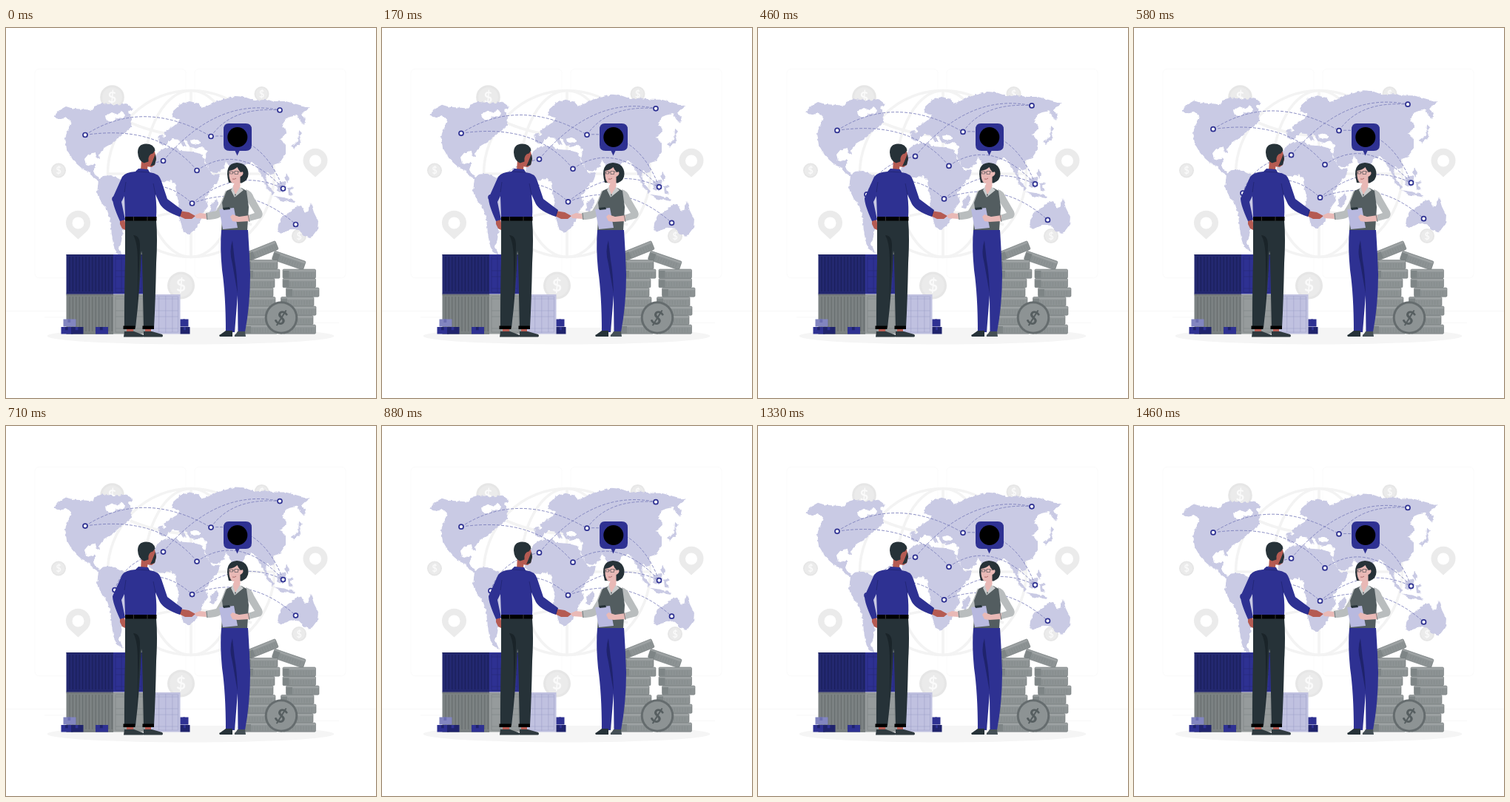
An HTML page that plays this animation: 500 px wide and 500 px high, repeating every 1.5 s.

```html
<!DOCTYPE html>
<html lang="en">
<head>
<meta charset="utf-8">
<title>Global trade</title>
<style>
  html, body { margin: 0; width: 100%; height: 100%; overflow: hidden; background: #fff; }
  svg { display: block; width: 100vw; height: 100vh; }
  text { font-family: Lato, sans-serif; text-anchor: middle; }
</style>
</head>
<body>
<svg viewBox="0 0 500 500">
  <defs>
    <filter id="coast" x="-5%" y="-5%" width="110%" height="110%" color-interpolation-filters="sRGB">
      <feTurbulence type="fractalNoise" baseFrequency=".25" seed="4"/>
      <feDisplacementMap in="SourceGraphic" scale="4" xChannelSelector="R" yChannelSelector="G"/>
    </filter>
  </defs>

  <g fill="none" stroke="#f5f5f5" stroke-width=".5">
    <rect x="39" y="55.3" width="204" height="282.4" rx="5.5"/>
    <rect x="255" y="55.3" width="204" height="282.4" rx="5.5"/>
    <path stroke="#ebebeb" stroke-width=".4" d="M0 382.5H500M417 398.6h33M397 389.3h19M52 391h43M104.500 391h6.300M131.500 395.200h93.700"/>
  </g>
  <g fill="none" stroke="#f3f3f3" stroke-width="3.6">
    <circle cx="250" cy="197" r="112.500"/>
    <ellipse cx="250" cy="197" rx="63" ry="112.500"/>
    <path d="M250 85V309M137 197H363M168 128Q250 163 332 128M168 266Q250 231 332 266"/>
  </g>
  <g id="backdrop"></g>
  <ellipse cx="249.500" cy="416.200" rx="193.900" ry="11.300" fill="#f5f5f5"/>

  <g id="map">
    <g fill="#c9cae4" filter="url(#coast)">
      <path d="M65 119L72 111 81 106 91 109 106 110 118 111 119 105 130 102 148 104 163 102 172 109 165 113 170 123 169 134 162 140 154 147 145 155 134 161 126 171 127 178 123 176 121 168 111 171 106 177 108 185 114 187 119 183 122 185 118 192 120 199 128 204 126 207 117 201 113 195 104 191 96 184 89 176 82 164 80 149 84 137 88 127 82 121 74 123 68 122Z"/>
      <path d="M125 206L131 200 142 199 151 203 159 207 169 214 180 222 179 236 172 250 163 262 158 274 156 288 153 298 158 309 151 306 146 297 143 280 141 260 137 247 129 236 123 223Z"/>
      <path d="M207 156L207 148 216 147 213 142 223 135 230 130 234 124 225 120 226 112 236 103 248 99 260 102 265 108 275 104 285 99 296 96 310 92 322 93 336 98 350 97 364 99 378 99 393 103 411 108 404 112 399 117 405 123 403 131 397 125 394 118 384 120 377 123 374 132 379 140 376 146 371 150 378 159 378 170 370 182 361 185 363 195 358 199 353 194 351 201 354 214 347 202 340 189 333 181 323 186 313 207 304 191 297 180 295 188 285 196 276 195 268 178 272 167 264 160 256 163 248 160 243 152 240 153 244 160 239 160 234 151 226 150 219 153 216 159Z"/>
      <path d="M205 168L215 162 230 161 236 166 250 167 264 170 270 184 278 198 290 197 286 208 276 219 270 229 273 241 267 249 262 262 255 273 246 279 240 276 236 262 231 248 234 236 230 224 229 212 223 206 212 208 202 208 194 200 195 187Z"/>
      <path d="M285 231L287 238 281 250 275 249 277 239ZM396 138L400 142 397 146 399 154 389 163 385 160 395 153ZM367 210L377 207 379 215 373 223 366 220ZM349 206L362 222 361 226 352 216ZM362 227L375 229 391 233 389 236 371 233ZM381 216L389 215 384 220 388 227 382 226ZM379 197L383 203 381 210 377 204ZM207 145L212 144 211 150 206 151Z"/>
      <path d="M368 266L372 256 383 250 391 242 399 240 403 248 408 249 412 236 416 249 422 261 421 272 412 284 403 281 396 273 385 272 372 278 367 275Z"/>
    </g>
    <path fill="#fff" filter="url(#coast)" d="M134 119L143 114 151 117 155 112 161 117 159 123 150 122 142 127 136 125ZM249 152L256 150 263 153 260 157 250 156Z"/>
    <path fill="none" stroke="#7d80bd" stroke-width=".9" stroke-dasharray="4 2"
      d="M107 144.500Q185 94 277 146.500M107 144.500Q207 130 258 192.500M212.500 179.500Q285 93 370 111M277 146.500Q305 106 370 111M277 146.500Q345 140 374.500 217M258 192.500Q315 153 374.500 217M251.500 237Q312 187 374.500 217M251.500 237Q328 208 391.500 265.500M147 231Q160 190 212.500 179.500M147 231Q203 192 251.500 237"/>
    <g id="stops" fill="#fff" stroke="#2e3192" stroke-width="1.700"></g>
  </g>

  <g id="goods"></g>

  <path fill="#2e3192" d="M301 129h23q8 0 8 8v21q0 8-8 8h-8.500l-3 6.500-3-6.500H302q-8 0-8-8v-21q0-8 7-8Z"/>
  <circle cx="312.800" cy="147.500" r="13.500"/>

  <!-- man -->
  <g>
    <path fill="#b55b52" d="M154 259l6 0 2 8-1 6-4-2-3-6ZM183 178l9 0-1 14-9 1ZM234 247l13 2 9 5-5 4-9 0-8-4Z"/>
    <path fill="#b55b52" d="M191 167l10 0 2 10-2 8-4 3-8-1Z"/>
    <path fill="#263238" d="M178 168q0-11 11-11.500 11 0 12.500 9l-3 4-3 1-3 5 0 5-6 2q-8-3-8.500-14.500Z"/>
    <path fill="#263238" d="M195 187l3-7 4-10 1 7-2 8Z"/>
    <ellipse cx="195.500" cy="175.500" rx="2.300" ry="4" fill="#b55b52"/>
    <path fill="#263238" d="M161 260h42q2 24 0 58-1 50-3 87h-14l-2-90-1-14q-2 54-8 104h-15q0-60 1-90Z"/>
    <path fill="#1a2429" d="M172 280q9 0 9 14-2 60-6 110 4-50 3-88 0-26-6-36Z"/>
    <path fill="#b55b52" d="M163 406h9v5h-9ZM188 406h8v5h-8Z"/>
    <path d="M158.500 402.500h16v4.500h-16ZM184.500 402.500h15.500v4.500h-15.500ZM161 255h42.500v5.500H161Z"/>
    <path stroke="#555" stroke-width=".7" d="M172.500 255v5.500M191 255v5.500"/>
    <path fill="#2f3a3f" d="M160 410h13l13 5q1 2-1 2.500h-26ZM186 410h11l14 4q2 2 0 3.500h-25Z"/>
    <path fill="#2e3192" d="M175 194l4-4 13 1 2 4q13 1 16 12l8 24 20 15-3 9q-21-7-27-17l-6-13q2 18 1 30h-42l-1-28-4 8 5 24-7 2q-10-22-10-31l13-29q4-6 18-7Z"/>
    <path fill="none" stroke="#1f236c" stroke-width=".7" d="M176 194l18 1M160 222l2-14M202 225l-3-15M235 254l2-8"/>
  </g>

  <!-- woman -->
  <g>
    <path fill="#263238" d="M301 209q-7-26 11-27 15 1 15.500 15 0 9-9 12.500Z"/>
    <path fill="#e9b9b6" d="M301.500 193q7-1 11-5 2 5 5 7 3-2 3 1t-4 5l0 13-6 10-4-10 2-4q-6 0-7-10Z"/>
    <path fill="none" stroke="#263238" stroke-width=".5" d="M302.500 194h4v3h-4ZM309 193.500h4.500v4H309ZM306.500 195h2.500M313.500 194.500l4-.5"/>
    <path fill="none" stroke="#9e5656" stroke-width=".8" d="M306 204q3 1 5-1"/>
    <path fill="#e9b9b6" d="M271 251l-9-1-7 3 2 4 14 1Z"/>
    <path fill="#b9bdbe" d="M297 219l-7 18-6 10-14 3 1 9q18 0 22-7l7-19ZM324 218q8 2 11 11l11 19q2 6-2 9l-15 4-2-8 9-3-10-16Z"/>
    <path fill="#535d60" d="M298 220l9-4 3 9 8-9 7 4 3 22-2 32h-35l2-30-1-8Z"/>
    <path fill="#c9cccd" d="M307 214l-3 5 5 10 2-4ZM315 214l6 5-11 9-1-3Z"/>
    <path fill="#e9b9b6" d="M310 211l5-2 1 6-6 10-3-8Z"/>
    <path fill="#2e3192" d="M291 273h36q2 30 3 60 0 40-7 78h-9.500l-.5-50-4 50h-12q0-50-5-84-3-30-1-54Z"/>
    <path fill="#1f236c" d="M306 287q-5 14 0 32l7 40q-1-30-4-45Z"/>
    <path fill="#263238" d="M297 409h9l0 8h-17q-2-2 1-3Z"/>
    <path fill="#455056" d="M313 410h10l1 7h-15q-1-2 2-4Z"/>
    <path fill="#b8b9df" d="M288 245l20-2 5 27-20 2Z"/>
    <path fill="#263238" d="M293 243l9-1 1 3-9 1Z"/>
    <path fill="#e9b9b6" d="M329 253l-14 2-9-3-3 3 3 6 7 1 16-1Z"/>
    <path stroke="#777d7f" d="M327 252l2 10M271 250l1 9" fill="none"/>
  </g>
</svg>
<script>
const byId = id => document.getElementById(id);
const rect = (x, y, w, h, fill, extra = '') =>
  `<rect x="${x}" y="${y}" width="${w}" height="${h}" fill="${fill}" ${extra}/>`;
const circle = (x, y, r, fill) => `<circle cx="${x}" cy="${y}" r="${r}" fill="${fill}"/>`;
const dollar = (x, y, size, fill, turn = 0) =>
  `<text x="${x}" y="${y + size * .36}" font-size="${size}" font-weight="700" fill="${fill}" transform="rotate(${turn} ${x} ${y})">$</text>`;
const lines = (d, stroke, width) => `<path d="${d}" fill="none" stroke="${stroke}" stroke-width="${width}"/>`;

const fadedCoin = ([x, y, r]) =>
  circle(x, y, r, '#e6e6e6') + circle(x, y, r * .82, '#ebebeb') + dollar(x, y, r * 1.25, '#fafafa');
const pin = ([x, y]) =>
  `<path fill="#ebebeb" fill-rule="evenodd" d="M${x} ${y + 22}l-12-11a16.500 16.500 0 1 1 24 0ZM${x - 8} ${y}a8 8 0 1 0 16 0a8 8 0 1 0-16 0Z"/>`;

byId('backdrop').innerHTML =
  [[143.5, 93.5, 16.3], [345.5, 89, 10], [71, 192.5, 10], [236.5, 348, 18.5], [396, 281, 10]].map(fadedCoin).join('') +
  [[418, 179.5], [97.5, 263.5]].map(pin).join('');

byId('stops').innerHTML =
  [[107, 144.5], [277, 146.5], [370, 111], [212.5, 179.5], [258, 192.5], [251.5, 237], [374.5, 217], [391.5, 265.5], [147, 231]]
    .map(([x, y]) => circle(x, y, 3, '#fff')).join('');

function ribs(y, fill, shade) {
  let d = '';
  for (let x = 86; x < 144; x += 4.4) d += `M${x} ${y + 3}v47`;
  return rect(81.5, y, 63.5, 53.5, fill) + lines(d, shade, 1.1) + lines(`M81.5 ${y + .6}h63.5M81.5 ${y + 53}h63.5`, shade, 1);
}
function doors(x, y, w, fill, shade) {
  let d = `M${x + w / 2} ${y + 2}v50M${x + 3} ${y + 3}h${w - 6}v48h${6 - w}Z`;
  for (const k of [.27, .73]) d += `M${x + w * k} ${y + 3}v48`;
  for (const k of [6, 22, 30, 46]) d += `M${x + 3} ${y + k}h${w - 6}`;
  return rect(x, y, w, 53.5, fill) + lines(d, shade, .5);
}
const box = (x, y, w, h, fill, shade) => rect(x, y, w, h, fill) + rect(x + w * .35, y, w * .22, h * .45, shade);

function coin(x, y, turn = 0, w = 44.5) {
  let d = '';
  for (let i = 10; i < w - 3; i += 3.6) d += `M${x + i} ${y + 4.5}v6`;
  return `<g transform="rotate(${turn} ${x + w / 2} ${y + 6})">` +
    rect(x, y, w, 12.2, '#8d9394', 'rx="1.5" stroke="#6f7677" stroke-width=".6"') +
    rect(x + .5, y + .6, w - 1, 2.6, '#9da2a3') + rect(x + .5, y + 2, 8, 9.6, '#7e8586') +
    lines(d, '#858b8c', .7) + '</g>';
}
const stack = (top, lefts) => lefts.map((x, i) => coin(x, top + i * 12.5)).join('');

byId('goods').innerHTML =
  ribs(306, '#232870', '#1b1f5a') + doors(145, 306, 41, '#2e3192', '#20246f') +
  ribs(360, '#7c8283', '#676d6e') + doors(145, 360, 55, '#969b9c', '#777d7e') +
  doors(196, 360, 39.5, '#c0c1e0', '#9a9cc6') +
  box(77.5, 393.5, 17, 10, '#8285c0', '#6b6eb0') +
  box(74.5, 404, 16, 9.5, '#2e3192', '#1f236c') + box(88, 404, 16.5, 9.5, '#1f236c', '#2e3192') +
  box(121, 404, 17, 9.5, '#2e3192', '#1f236c') +
  box(235.5, 393.5, 11, 10, '#2e3192', '#2e3192') + box(235.5, 404, 13, 9.5, '#1f236c', '#2e3192') +
  coin(325.5, 295, -22, 42) + coin(360, 308, 19) +
  stack(313.5, [322.5, 325.5, 318.5, 316.5, 319.5, 319.5, 315.5, 322.5]) +
  stack(326, [374, 374, 378.5, 371.5, 374.5, 370.5, 374]) +
  circle(372, 391.5, 22.3, '#656c6e') + circle(372, 391.5, 19.3, '#8d9394') +
  dollar(372, 391.5, 26, '#565e60', 27);

// The map rises 10 units and sinks back at constant speed, 36 steps per loop.
const LOOP = 1500, STEPS = 36;
function frame() {
  const step = Math.floor((performance.now() % LOOP + 4) / LOOP * STEPS) % STEPS;
  const rise = 10 * (1 - Math.abs(1 - 2 * step / STEPS));
  byId('map').setAttribute('transform', `translate(0 ${-rise})`);
  requestAnimationFrame(frame);
}
frame();
</script>
</body>
</html>
```
